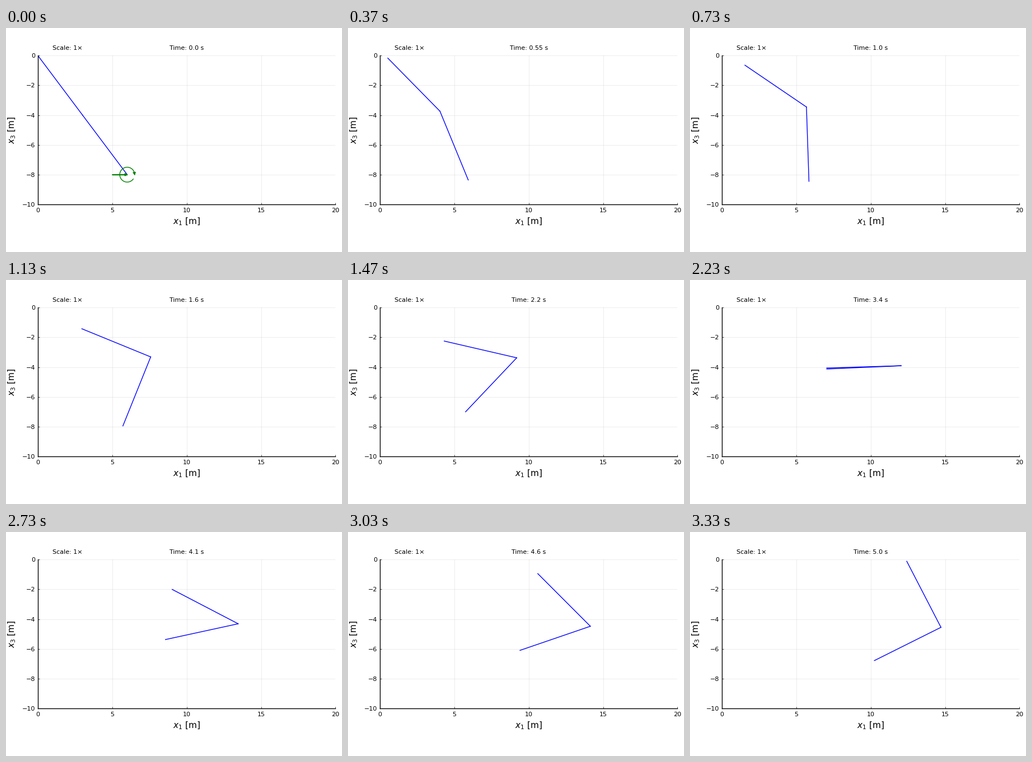
A matplotlib script that plays this animation: 600 by 400 pixels, repeating every 3.36 s.

```python
import math

import matplotlib.pyplot as plt
import numpy as np
from matplotlib.animation import FuncAnimation
from matplotlib.patches import FancyArrowPatch

W, H, DPI = 600, 400, 100
FRAMES, LOOP_MS = 101, 3360
DT, SUBSTEPS = 0.05, 10

# two hinged rods in free flight, pushed and twisted at the lower end
LINK, MASS, ROTARY = 5.0, 5.0, 10.0
FORCE, FORCE_END = 42.22, 0.5
MOMENT, MOMENT_END = 250.0, 0.46

INERTIA = MASS * (LINK**2 / 12 + ROTARY)
COUPLE = MASS * LINK**2 / 8
DIAG = INERTIA + COUPLE


def rates(state, t):
    """Time derivative of (angle 1, angle 2, speed 1, speed 2)."""
    a, b, wa, wb = state
    force = FORCE if t < FORCE_END else 0.0
    moment = MOMENT if t < MOMENT_END else 0.0
    c, s = math.cos(a - b), math.sin(a - b)
    qa = COUPLE * s * wb**2 + force * LINK / 4 * math.sin(a)
    qb = -COUPLE * s * wa**2 - force * LINK * 0.75 * math.sin(b) - moment
    off = -COUPLE * c
    det = DIAG**2 - off**2
    return np.array([wa, wb, (DIAG * qa - off * qb) / det,
                     (DIAG * qb - off * qa) / det])


def simulate():
    tilt = math.atan2(4, -3)
    state = np.array([tilt, tilt - math.pi, 0.0, 0.0])
    h = DT / SUBSTEPS
    angles = [state[:2].copy()]
    for i in range((FRAMES - 1) * SUBSTEPS):
        tm = (i + 0.5) * h
        k1 = rates(state, tm)
        k2 = rates(state + h / 2 * k1, tm)
        k3 = rates(state + h / 2 * k2, tm)
        k4 = rates(state + h * k3, tm)
        state = state + h / 6 * (k1 + 2 * k2 + 2 * k3 + k4)
        if (i + 1) % SUBSTEPS == 0:
            angles.append(state[:2].copy())
    return angles


ANGLES = simulate()


def center(t):
    acc = FORCE / (2 * MASS)
    if t < FORCE_END:
        x = acc * t**2 / 2
    else:
        x = acc * FORCE_END * (t - FORCE_END / 2)
    return np.array([3 + x, -4.0])


def pose(k):
    """Upper end, hinge and lower end."""
    a, b = (LINK * np.array([math.cos(q), math.sin(q)]) for q in ANGLES[k])
    hinge = center(k * DT) - (a + b) / 4
    return hinge + a, hinge, hinge + b


def time_label(k):
    # two significant digits
    value = round(k * DT, 2) if k < 20 else round(k / 2) / 10
    return f"Time: {value} s"


plt.rcParams["font.family"] = "DejaVu Sans"
plt.rcParams["mathtext.fontset"] = "dejavusans"

fig = plt.figure(figsize=(W / DPI, H / DPI), dpi=DPI, facecolor="white")
LEFT, TOP, WIDTH = 57.0, 49.3, 531.4
HEIGHT = WIDTH / 2
ax = fig.add_axes([LEFT / W, 1 - (TOP + HEIGHT) / H, WIDTH / W, HEIGHT / H])
ax.set_xlim(0, 20)
ax.set_ylim(-10, 0)
ax.set_xticks(range(0, 21, 5))
ax.set_yticks(range(-10, 1, 2))
ax.set_axisbelow(True)
ax.grid(color="black", alpha=0.1, linewidth=0.5)
ax.tick_params(direction="in", width=0.5, length=2.5, labelsize=8, pad=3.5)
ax.tick_params(axis="x", pad=4.5)
for side in ("top", "right"):
    ax.spines[side].set_visible(False)
for side in ("left", "bottom"):
    ax.spines[side].set_linewidth(1)
ax.set_xlabel("$x_1$ [m]", fontsize=11, labelpad=4)
ax.set_ylabel("$x_3$ [m]", fontsize=11, labelpad=6)

ax.text(2, 0.5, "Scale: 1×", fontsize=8, ha="center", va="center")
clock = ax.text(10, 0.5, "", fontsize=8, ha="center", va="center")

rods = [ax.plot([], [], color="blue", lw=1)[0] for _ in range(2)]
push, = ax.plot([], [], color="green", lw=1)
twist, = ax.plot([], [], color="green", lw=1)


def arrow_head():
    head = FancyArrowPatch((0, 0), (1, 0), mutation_scale=1,
                           arrowstyle="simple,head_length=3,head_width=3",
                           shrinkA=0, shrinkB=0, color="green", lw=1, zorder=3)
    ax.add_patch(head)
    return head


push_head, twist_head = arrow_head(), arrow_head()
load = [push, twist, push_head, twist_head]
sweep = np.linspace(0.9 * 2 * math.pi, 0, 60)
ring = 0.5 * np.array([np.cos(sweep), np.sin(sweep)])


def draw(k):
    top, hinge, tip = pose(k)
    for rod, end in zip(rods, (top, tip)):
        rod.set_data([end[0], hinge[0]], [end[1], hinge[1]])
    clock.set_text(time_label(k))

    loaded = k * DT < FORCE_END - 1e-9
    for part in load:
        part.set_visible(loaded)
    if loaded:
        x, y = tip
        push.set_data([x - 1, x], [y, y])
        push_head.set_positions((x - 1, y), (x, y))
        twist.set_data(x + ring[0], y + ring[1])
        twist_head.set_positions((x + ring[0, -4], y + ring[1, -4]),
                                 (x + 0.5, y))
    return [*rods, clock, *load]


anim = FuncAnimation(fig, draw, frames=FRAMES, interval=LOOP_MS / FRAMES,
                     repeat=True, blit=False)
plt.show()
```
